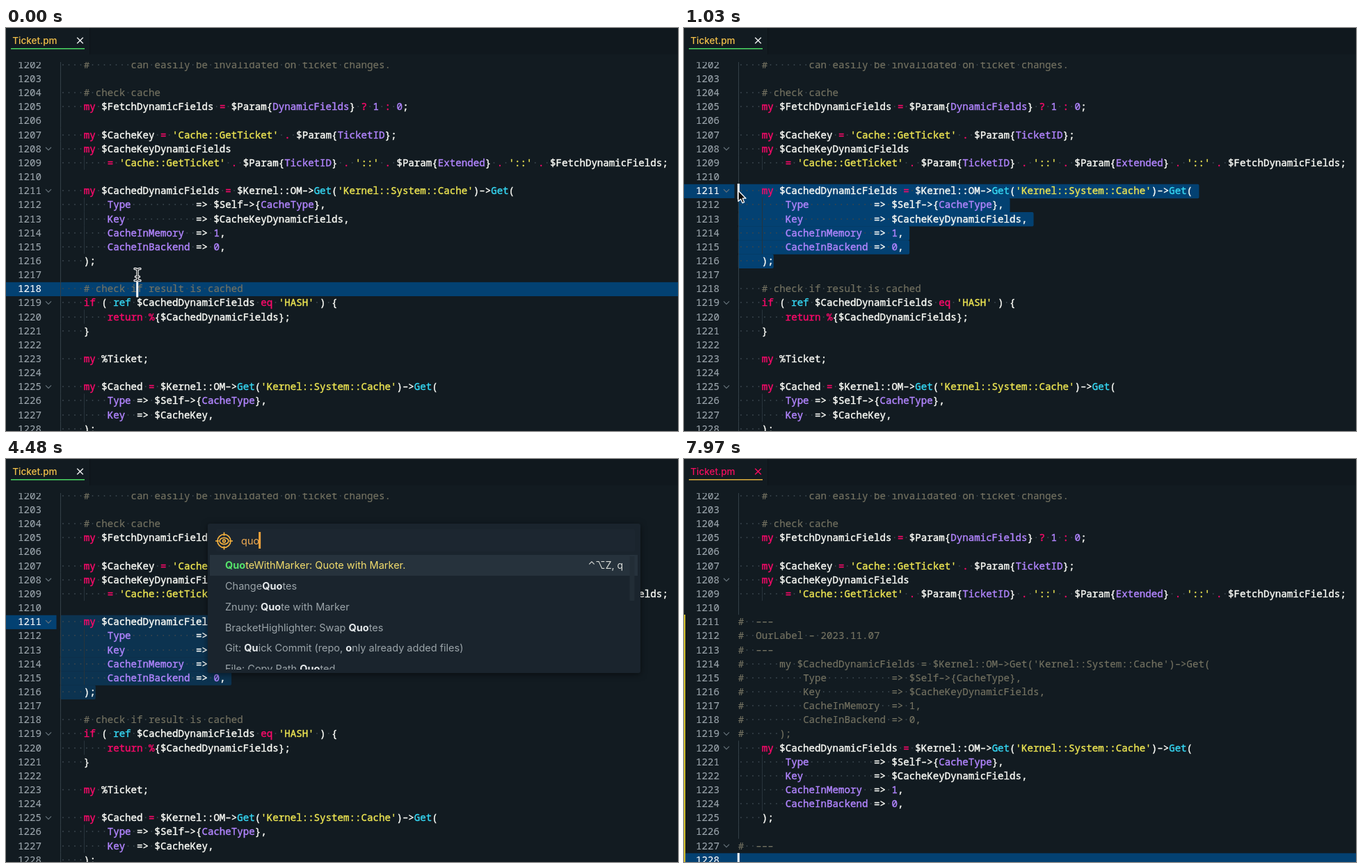
Animation of 966 by 580 pixels, one loop 8 s. Source, as an HTML page:

```html
<!DOCTYPE html>
<html lang="en">
<head>
<meta charset="utf-8">
<title>Ticket.pm</title>
<style>
  html, body { margin: 0; width: 100%; height: 100%; overflow: hidden; background: #121b21; }
  svg { display: block; }
  .code {
    font: 500 14.158px "Noto Sans Mono", "DejaVu Sans Mono", monospace;
    color: #fafbf6; fill: currentColor; stroke: currentColor; stroke-width: .4;
  }
  .ui { font: 400 14.5px Inter, "DejaVu Sans", sans-serif; fill: #9ba4a9; }
  .num { color: #9aa4ab; stroke-width: .12; }
  .num.on { color: #fff; }
  .dot { color: #3a464e; stroke: none; }
  .com { color: #757362; stroke-width: .15; }
  .str { color: #ece452; }
  .key { color: #f90a6a; }
  .fn { color: #35d6f2; }
  .val { color: #b285ff; }
  .hit { fill: #e4e8ea; font-weight: 700; }
  .top { fill: #f2dc6c; }
  .top .hit { fill: #55e36a; }
  .fold { fill: none; stroke: #66727a; stroke-width: 1.2; }
  #popup { filter: drop-shadow(0 2px 5px rgba(0, 0, 0, .5)); }
</style>
</head>
<body>
<script>
const LOOP = 8000, W = 966, H = 580;
const FIRST = 1202, X0 = 77.8, CW = 8.495, LH = 20.15;
const POPUP_IN = 2440, POPUP_OUT = 5210, CLICK = 7250;

const before = `    #       can easily be invalidated on ticket changes.

    # check cache
    my $FetchDynamicFields = $Param{DynamicFields} ? 1 : 0;

    my $CacheKey = 'Cache::GetTicket' . $Param{TicketID};
    my $CacheKeyDynamicFields
        = 'Cache::GetTicket' . $Param{TicketID} . '::' . $Param{Extended} . '::' . $FetchDynamicFields;

    my $CachedDynamicFields = $Kernel::OM->Get('Kernel::System::Cache')->Get(
        Type           => $Self->{CacheType},
        Key            => $CacheKeyDynamicFields,
        CacheInMemory  => 1,
        CacheInBackend => 0,
    );

    # check if result is cached
    if ( ref $CachedDynamicFields eq 'HASH' ) {
        return %{$CachedDynamicFields};
    }

    my %Ticket;

    my $Cached = $Kernel::OM->Get('Kernel::System::Cache')->Get(
        Type => $Self->{CacheType},
        Key  => $CacheKey,
    );`.split('\n');

const block = before.slice(9, 15);
const after = [
  ...before.slice(0, 9),
  '#  ---', '#  OurLabel - 2023.11.07', '#  ---',
  ...block.map(s => '#  ' + s), ...block,
  '', '#  ---', ''
];

const folders = [
  'AddFolderToProject: Add Folder to Project', 'AddFolderToProject: Add Folders To Project',
  'AddFolderToProject: Add This Folder To Project', 'AddFolderToProject: Copy Dir Path',
  'AddFolderToProject: Copy File Path', 'AddFolderToProject: Create Project From File'
];
const quotes = [
  '{Quo}teWithMarker: Quote with Marker.', 'Change{Quo}tes', 'Znuny: {Quo}te with Marker',
  'BracketHighlighter: Swap {Quo}tes', 'Git: {Qu}ick Commit (repo, {o}nly already added files)',
  'File: Copy Path {Quo}ted'
];

// time, pointer x, pointer y, caret line, caret column
const DRAG = [
  [0, 189, 355, 1218, 13], [80, 186, 352, 1218, 13], [150, 166, 345, 1218, 13],
  [230, 142, 338, 1218, 13], [310, 130, 336, 1216, 6], [380, 127, 331, 1216, 6],
  [460, 118, 311, 1215, 5], [560, 104, 276, 1213, 3], [640, 95.5, 255, 1212, 2],
  [710, 86, 240, 1211, 1], [790, 81, 236, 1211, 0], [960, 79, 235, 1211, 0],
  [1030, 78, 234, 1211, 0]
];
const LEAVE = [[7740, 214, 573], [7820, 222, 578], [7890, 233, 584], [7970, 240, 610]];
const TYPED = [[POPUP_IN, 0], [2850, 1], [3660, 2], [3910, 3]];

const NS = 'http://www.w3.org/2000/svg';
function el(tag, attrs, parent, text) {
  const e = document.createElementNS(NS, tag);
  for (const k in attrs) e.setAttribute(k, attrs[k]);
  if (text) e.textContent = text;
  if (parent) parent.append(e);
  return e;
}
const rect = (x, y, w, h, fill, parent, rx = 0) =>
  el('rect', { x, y, width: w, height: h, fill, rx, stroke: 'none' }, parent);
const set = (e, attrs) => { for (const k in attrs) e.setAttribute(k, attrs[k]); };
const show = (e, on) => { e.style.display = on ? '' : 'none'; };
const last = (rows, t) => rows.reduce((a, r) => r[0] <= t ? r : a, rows[0]);
const topOf = n => 62.8 + (n - 1203) * LH;
const bandOf = n => topOf(n) + .8;
const colX = c => X0 + c * CW;

const stage = el('svg', { width: W, height: H, viewBox: `0 0 ${W} ${H}` }, document.body);
rect(0, 0, W, H, '#121b21', stage);
const marks = el('g', {}, stage);
const row = rect(0, 0, W, LH, '#034172', marks);
const picks = Array.from({ length: 6 }, () => rect(0, 0, 0, LH + .3, '#034172', marks, 2));

const RULES = [
  ['com', '#.*'], ['str', "'[^']*'"], ['key', '\\b(?:my|if|return|eq)\\b'],
  ['fn', '\\b(?:ref|Get)\\b'], ['val', '\\w+(?=\\s*=>)|(?<=\\{)\\w+|\\b\\d\\b'],
  ['key', '(?<= )[=?:.](?= )|%(?=\\{)']
];
const LEXER = new RegExp(RULES.map(r => `(${r[1]})`).join('|'), 'g');

function put(line, s, cls) {
  for (const part of s.replace(/-/g, '–').split(/( +)/)) {
    if (!part) continue;
    const gap = part[0] === ' ';
    el('tspan', { class: gap ? 'dot' : cls }, line, gap ? '·'.repeat(part.length) : part);
  }
}

function buildCode(lines, folds, hasGuide) {
  const g = el('g', { class: 'code' }, stage), nums = {};
  lines.forEach((s, i) => {
    const n = FIRST + i, y = topOf(n), base = y + 15.2;
    nums[n] = el('text', { x: 17, y: base, class: 'num' }, g, n);
    if (hasGuide(s, n)) rect(78, y, 1, LH + .2, '#333f47', g);
    if (s.startsWith('        ')) rect(112, y, 1, LH + .2, '#28343c', g);
    const line = el('text', { x: X0, y: base }, g);
    let at = 0;
    for (const m of s.matchAll(LEXER)) {
      put(line, s.slice(at, m.index), '');
      put(line, m[0], RULES[m.slice(1).findIndex(Boolean)][0]);
      at = m.index + m[0].length;
    }
    put(line, s.slice(at), '');
    if (folds.includes(n)) el('path', { class: 'fold', d: `M57 ${y + 8.2}l4 4l4 -4` }, g);
  });
  return { g, nums };
}
const oldCode = buildCode(before, [1208, 1211, 1219, 1225], () => true);
const newCode = buildCode(after, [1208, 1219, 1220, 1227], (s, n) => s[0] !== '#' && n < 1227);
rect(0, 224, 2, 356, '#cdbb2c', newCode.g);
const caret = rect(0, 0, 3, 22.5, '#fff', stage);

// Tab bar
rect(0, 0, W, 49, '#121b21', stage);
rect(120, 0, W - 120, 38, '#10181e', stage);
rect(120, 0, 1, 38, '#0c1318', stage);
const title = el('text', { x: 9.3, y: 23, class: 'ui', style: 'font-size:13.5px;font-weight:500' }, stage, 'Ticket.pm');
const cross = el('path', { d: 'M102.2 13.7l8.6 8.6m0 -8.6l-8.6 8.6', 'stroke-width': 1.5 }, stage);
const under = rect(7, 29, 106, 1.5, '#fff', stage);

// Command palette
const popup = el('g', { id: 'popup', class: 'ui' }, stage);
rect(290, 93, 622, 215, '#1a242d', popup, 3);
rect(302, 101, 602, 32, '#1c2630', popup, 2);
const icon = el('g', { fill: 'none', stroke: '#f3b03e', 'stroke-width': 1.7 }, popup);
el('circle', { cx: 313.5, cy: 118, r: 9.5 }, icon);
el('ellipse', { cx: 313.5, cy: 118, rx: 6.4, ry: 4.6 }, icon);
el('circle', { cx: 313.5, cy: 118, r: 1.8 }, icon);
el('path', { d: 'M313.5 105.5v5m0 15v5M301 118h5m15 0h5' }, icon);
const query = el('text', { x: 338, y: 123, style: 'fill:#f0ab52' }, popup);
const queryCaret = rect(337, 105, 3, 24, '#f2a33c', popup);
const list = el('svg', { x: 290, y: 138, width: 622, height: 165, viewBox: '290 138 622 165' }, popup);
rect(293, 138, 615, 30, '#26323c', list);

function buildList(items, typed, keys) {
  const g = el('g', {}, list);
  items.forEach((s, i) => {
    const t = el('text', { x: 315, y: 158.4 + i * 29.7, class: i ? '' : 'top' }, g);
    let left = typed;
    s.split(/[{}]/).forEach((part, j) => {
      const hit = j % 2 ? part.slice(0, left) : '';
      if (hit) el('tspan', { class: 'hit' }, t, hit);
      if (part.length > hit.length) el('tspan', {}, t, part.slice(hit.length));
      left -= hit.length;
    });
  });
  el('text', { x: 887, y: 158.4, 'text-anchor': 'end', style: 'fill:#d9dcd8;font-size:14px' }, g, keys);
  return g;
}
const early = [0, 1, 4, 2, 3, 5].map(i => quotes[i]);
const lists = [buildList(folders, 0, '⌃⌥K, p')].concat(
  [early, early, quotes].map((q, i) => buildList(q, i + 1, '⌃⌥Z, q')));
const thumb = rect(896.5, 140, 7, 44, '#b9a843', list, 1);

// Pointers
const beam = el('g', { fill: 'none', 'stroke-linecap': 'round' }, stage);
const BEAM = 'M-4 -8.5Q0 -8.5 0 -6Q0 -8.5 4 -8.5M0 -6V6M-4 8.5Q0 8.5 0 6Q0 8.5 4 8.5M-2.5 3h5';
el('path', { d: BEAM, stroke: '#fff', 'stroke-width': 3.4 }, beam);
el('path', { d: BEAM, stroke: '#15191c', 'stroke-width': 1.2 }, beam);
const arrow = el('path', {
  d: 'M0 0V15.5L3.6 12.2L6 17.8L8.6 16.7L6.3 11.2H11Z',
  fill: '#0a0a0a', stroke: '#fff', 'stroke-width': 1.3, 'stroke-linejoin': 'round'
}, stage);

function pointer(t) {
  if (t < 2850) return last(DRAG, t);
  if (t < 6360) return null;
  if (t >= LEAVE[0][0]) return last(LEAVE, t);
  const k = Math.min(9, Math.floor((t - 6360) / 80)) / 9;
  const e = k * k * (3 - 2 * k);
  return [t, 81 + 129 * e, 240 + 331 * e];
}

function select(lines, l1, c1, l2, c2, fill) {
  picks.forEach((p, i) => {
    const n = l1 + i;
    const from = n === l1 ? c1 : 0;
    const to = n === l2 ? c2 : (lines[n - FIRST] || '').length + 1;
    const on = n <= l2 && to > from;
    show(p, on);
    if (on) set(p, { x: colX(from), y: bandOf(n), width: (to - from) * CW, fill });
  });
}

function render(t) {
  const edited = t >= POPUP_OUT, open = t >= POPUP_IN && !edited;
  const code = edited ? newCode : oldCode;
  show(oldCode.g, !edited);
  show(newCode.g, edited);

  let line, col, full;
  if (!edited) {
    [, , , line, col] = last(DRAG, t);
    full = t < 380;
    if (full) select(before, 1, 0, 0, 0);
    else select(before, line, col, 1216, 6, open ? '#0c3350' : '#034172');
  } else {
    full = t >= CLICK;
    [line, col] = full ? [1228, 0] : [1212, 24];
    if (full) select(after, 1, 0, 0, 0);
    else select(after, 1212, 3, 1212, 24, '#034172');
  }
  set(row, { y: bandOf(line), width: full ? W : 72.5 });
  set(caret, { x: colX(col) - 1, y: Math.round(topOf(line)) });
  show(caret, !open);
  for (const n in code.nums) code.nums[n].classList.toggle('on', +n === line);

  title.style.fill = edited ? '#f40d5f' : '#f2c04a';
  set(cross, { stroke: edited ? '#f40d5f' : '#e9ebec' });
  set(under, { fill: edited ? '#dfb03e' : '#4bd964' });

  show(popup, open);
  if (open) {
    const n = last(TYPED, t)[1];
    lists.forEach((g, i) => show(g, i === n));
    query.textContent = 'quo'.slice(0, n);
    set(queryCaret, { x: 337 + (n ? query.getComputedTextLength() : 0) });
    const faded = t >= 4480 || (t >= 3500 && t < 3660);
    const fading = t >= 3420 && t < 3500;
    set(thumb, {
      height: [44, 47, 47, 64][n],
      fill: faded ? '#222d36' : fading ? '#6b673c' : '#b9a843'
    });
  }

  const p = pointer(t), isArrow = t >= 1030 && t < 2850;
  show(beam, p && !isArrow);
  show(arrow, p && isArrow);
  if (p) set(isArrow ? arrow : beam, { transform: `translate(${p[1]} ${p[2]})` });
}

const start = performance.now();
function tick() {
  render((performance.now() - start) % LOOP);
  requestAnimationFrame(tick);
}
tick();
</script>
</body>
</html>
```
